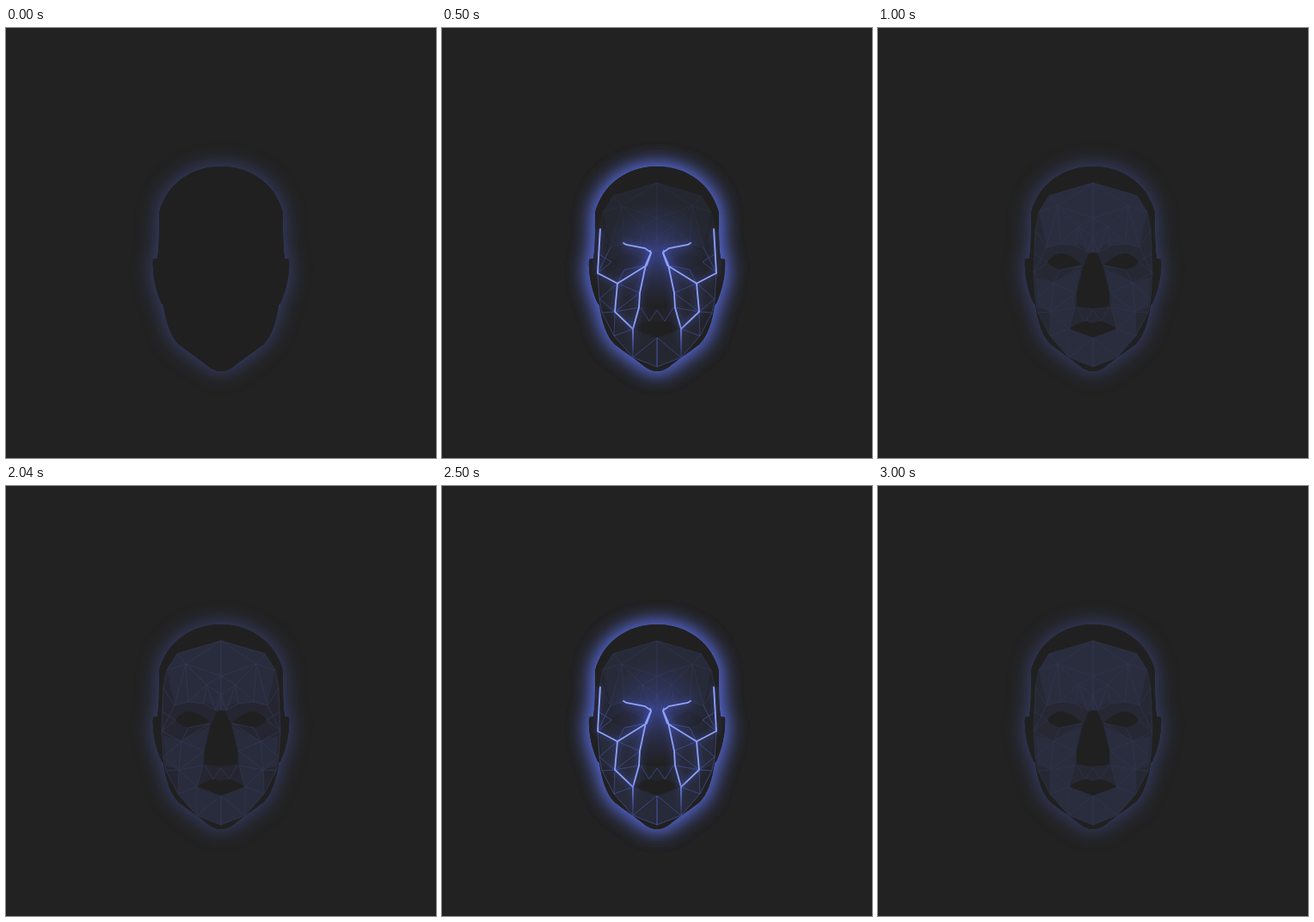
Animation of 500 by 500 pixels, one loop 3.04 s. Source, as an HTML page with a canvas:

```html
<!DOCTYPE html>
<html lang="en">
<head>
<meta charset="utf-8">
<title>Glowing face</title>
<style>
  html, body { margin: 0; height: 100%; overflow: hidden; background: #222; }
  canvas { display: block; }
</style>
</head>
<body>
<canvas id="stage" width="500" height="500"></canvas>
<script>
const ctx = document.getElementById('stage').getContext('2d');
const LOOP = 3040, CYCLE = 2000, PEAK = 560, END = 1000;

// Every shape is given as its left half and mirrored about x = 250.
const mirror = new DOMMatrix([-1, 0, 0, 1, 500, 0]);
function both(...parts) {
  const half = new Path2D(parts.join(''));
  const whole = new Path2D(half);
  whole.addPath(half, mirror);
  return whole;
}

const head = both(
  'M250 161C214 161 186 183 178 215L178 236Q178 255 176 268L171 269',
  'C170 286 174 305 181 320L183 322C186 342 191 358 201 368',
  'C214 378 224 384 236 394Q243 399 250 399Z');

const mask = both(
  'M250 180L199 195L187 214L183 235L181 285L183 315L186 331L200 358L222 383L250 394Z',
  'M197 272Q203 263 213 262Q226 264 237 275Q226 279 212 281Q201 278 197 272Z',
  'M250 261Q246 261 244 264L238 279L231 308L231 323Q240 326 250 326Z',
  'M223 349Q236 341 242 341L250 343L250 360Q235 358 223 349Z');

const lightFacets = both(
  'M250 180L199 195L187 214L196 255L212 251L236 253L246 261L250 261Z',
  'M183 290L204 296L237 279L230 308L229 325L222 350L222 383L201 359L201 330L186 325Z',
  'M250 360L223 350L223 383L250 394Z');

const foreheadMesh = both(
  'M250 221L209 207L212 251L233 231L209 207M233 231L250 221L250 261',
  'M233 231L250 243L244 261L233 231L230 253M212 251L230 253L244 261');

const crownMesh = both(
  'M250 180L209 207L199 195M187 214L209 207L196 255L212 251M250 180L250 221',
  'M250 180L199 195L187 214L183 235L196 255');

const cheekMesh = both(
  'M183 235L181 285L204 297L237 276L212 281L204 297M196 255L181 285L197 272L181 262',
  'M181 285L183 315L204 297L230 308L201 330L204 297M183 315L201 330L186 331L183 315',
  'M186 331L200 358L201 330L222 350L200 358L222 383L222 350M201 330L229 325L222 350',
  'M231 325L241 341L250 328M222 383L250 360L250 394L222 383');

const beams = both(
  'M222 380L222 350L229 325L230 308L237 275L243 261L236 256L214 252L211 250',
  'M184 234L181 285L204 297L238 276L243 262L242 259',
  'M222 350L201 330L204 297');

const spark = both('M250 176Q242 177 237 182Q231 186 222 187Q235 189 240 193Q247 199 250 216Z');

const clamp = x => Math.min(1, Math.max(0, x));
const ramp = (t, from, to) => clamp((t - from) / (to - from));
const smooth = x => x * x * (3 - 2 * x);
const mix = (a, b, k) => a + (b - a) * k;

function fill(path, color, alpha = 1, rule = 'nonzero') {
  ctx.globalAlpha = alpha;
  ctx.fillStyle = color;
  ctx.fill(path, rule);
}

function stroke(path, color, alpha, width = 1) {
  ctx.globalAlpha = alpha;
  ctx.strokeStyle = color;
  ctx.lineWidth = width;
  ctx.stroke(path);
}

function light(x, y, radius, rgb, alpha) {
  const g = ctx.createRadialGradient(x, y, 0, x, y, radius);
  g.addColorStop(0, `rgba(${rgb},1)`);
  g.addColorStop(0.5, `rgba(${rgb},.4)`);
  g.addColorStop(1, `rgba(${rgb},0)`);
  ctx.globalAlpha = alpha;
  ctx.fillStyle = g;
  ctx.fillRect(x - radius, y - radius, 2 * radius, 2 * radius);
}

function drawHalo(power) {
  ctx.save();
  ctx.shadowBlur = 24;
  for (const alpha of [mix(0.5, 1, power), power]) {
    ctx.shadowColor = `rgba(88,106,218,${alpha})`;
    fill(head, '#212121');
  }
  ctx.restore();
  fill(head, '#202020');
}

function drawBeams(progress, alpha) {
  if (progress <= 0 || alpha <= 0) return;
  const fade = ctx.createLinearGradient(0, 342, 0, 380);
  fade.addColorStop(0, 'rgb(146,164,252)');
  fade.addColorStop(1, 'rgba(90,110,230,0)');
  ctx.save();
  ctx.lineCap = 'round';
  ctx.setLineDash([160 * progress, 400]);
  ctx.shadowColor = 'rgb(80,100,240)';
  ctx.shadowBlur = 9;
  stroke(beams, fade, alpha, 1.8);
  ctx.restore();
}

function draw(time) {
  const t = time % CYCLE;
  const first = time < CYCLE;
  const rising = t < PEAK;
  const resting = t >= END || t < 40;

  const rise = smooth(ramp(t, 40, PEAK));
  const fall = ramp(t, PEAK, END);
  const power = rising ? rise : Math.pow(1 - fall, 1.6);
  const maskAlpha = rising
    ? (first ? 0.4 * rise : mix(0.9, 0.7, rise))
    : mix(first ? 0.4 : 0.7, 1, smooth(fall));
  const face = rise * (1 - ramp(t, PEAK, 680));
  const forehead = ramp(t, PEAK, 700) * (1 - ramp(t, 740, END));
  const crown = ramp(t, 630, 740) * (1 - ramp(t, 760, 960));

  ctx.globalAlpha = 1;
  ctx.fillStyle = '#222';
  ctx.fillRect(0, 0, 500, 500);
  drawHalo(power);

  ctx.save();
  ctx.clip(head);
  ctx.lineJoin = 'round';
  const shown = first && t < 40 ? 0 : maskAlpha;
  fill(mask, 'rgb(38,40,52)', shown, 'evenodd');
  fill(lightFacets, 'rgb(42,45,62)', shown);
  const lineAlpha = resting ? 0.55 : mix(0.85, 0.55, fall);
  for (const mesh of [crownMesh, foreheadMesh, cheekMesh])
    stroke(mesh, 'rgb(51,55,80)', shown * lineAlpha);

  light(250, 264, 62, '66,80,180', 0.6 * face);
  stroke(cheekMesh, 'rgb(76,92,190)', 0.45 * face);

  light(250, 238, 60, '62,76,170', 0.3 * forehead);
  stroke(foreheadMesh, 'rgb(88,106,212)', 0.75 * forehead, 1.2);
  light(250, 186, 40, '76,92,190', 0.6 * crown);
  fill(spark, 'rgb(82,98,196)', 0.75 * crown);
  ctx.restore();

  drawBeams(smooth(ramp(t, 40, 480)), face);
}

const start = performance.now();
function tick() {
  draw((performance.now() - start) % LOOP);
  requestAnimationFrame(tick);
}
tick();
</script>
</body>
</html>
```
